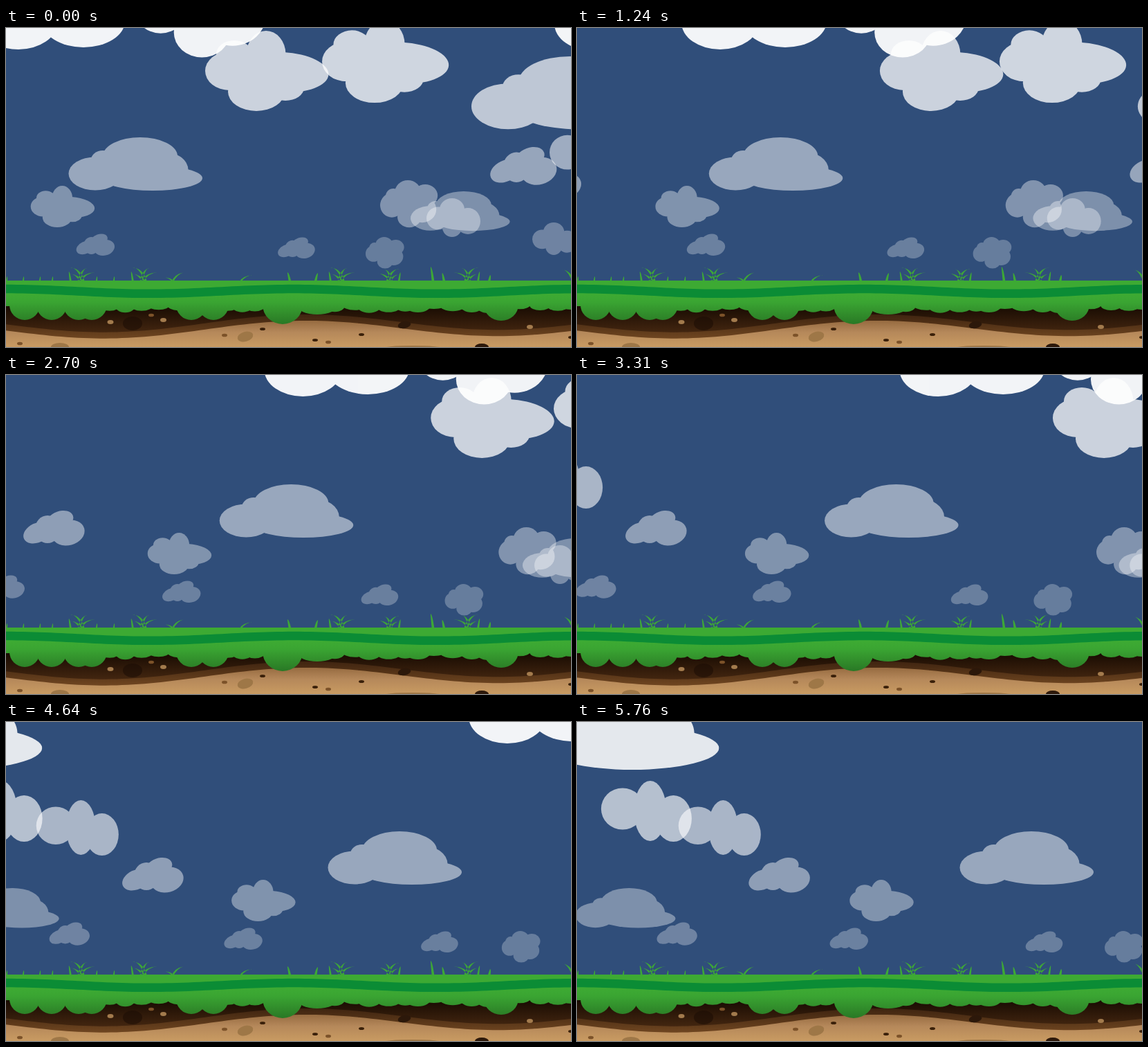
An HTML page that plays this animation: 817 px wide and 461 px high, repeating every 5.86 s.

```html
<!DOCTYPE html>
<html lang="en">
<head>
<meta charset="utf-8">
<title>Drifting clouds</title>
<style>
  html, body { margin: 0; width: 100%; height: 100%; overflow: hidden; background: #304e7a; }
  svg { display: block; width: 100vw; height: 100vh; }
</style>
</head>
<body>
<svg viewBox="0 0 817 461" preserveAspectRatio="none">
  <defs>
    <linearGradient id="turf" gradientUnits="userSpaceOnUse" x1="0" y1="386" x2="0" y2="428">
      <stop offset="0" stop-color="#3daa33"/><stop offset=".25" stop-color="#3aa432"/><stop offset="1" stop-color="#297825"/>
    </linearGradient>
    <linearGradient id="soil" gradientUnits="userSpaceOnUse" x1="0" y1="402" x2="0" y2="440">
      <stop offset="0" stop-color="#180b02"/><stop offset="1" stop-color="#432610"/>
    </linearGradient>
    <linearGradient id="clay" gradientUnits="userSpaceOnUse" x1="0" y1="414" x2="0" y2="448">
      <stop offset="0" stop-color="#3f2410"/><stop offset="1" stop-color="#6e4520"/>
    </linearGradient>
    <linearGradient id="sand" gradientUnits="userSpaceOnUse" x1="0" y1="422" x2="0" y2="461">
      <stop offset="0" stop-color="#94693f"/><stop offset=".45" stop-color="#b5885a"/><stop offset="1" stop-color="#c99b62"/>
    </linearGradient>
  </defs>
  <rect width="817" height="461" fill="#304e7a"/>
  <g id="sky" fill="#fff"></g>
  <g id="ground"></g>
</svg>
<script>
const WIDTH = 817, LOOP = 5860;
const SPEED = 0.0808, FARTHEST = 463, STEP = 50.75;

// Each kind: depth it is drawn at, then ellipses as cx, cy, rx, ry, rotation.
const KINDS = {
  flat: [1, [38.5, 52.5, 38.5, 24], [49.5, 33, 17, 14], [103.5, 27, 54, 27], [134.5, 47, 38.5, 27], [121.5, 59, 72, 18]],
  trio: [1.287, [31, 40.5, 31, 30], [71, 43.5, 23.5, 43.5], [104.5, 54.5, 26.5, 33.5]],
  tailed: [1.495, [35, 58, 35, 28], [42, 34, 26, 20], [88, 34, 28.5, 34], [112, 60, 66.5, 29, 3], [74, 88, 41, 28], [116, 82, 27, 19]],
  slanted: [0.912, [21, 32, 21, 14, -25], [36, 27, 18, 20], [54, 14, 20, 13, -20], [66, 32, 24, 18, -15]],
  blob: [0.783, [17, 36, 17, 17.5], [19, 23, 11, 11], [40, 18, 19, 18], [65, 22, 18, 16], [60.5, 42, 20.5, 19], [42, 53, 17, 15], [40, 37, 20, 14]],
  clover: [0.715, [17, 29, 17, 16.5], [37, 16, 18, 16], [60, 33, 18, 19], [37, 42, 14, 14], [40, 30, 20, 15]],
  twin: [1.885, [56, 39, 56, 39], [150, 37, 60, 38]]
};

// kind, start x, top y, depth; depth sets size, speed and opacity alike.
const CLOUDS = [
  ['blob', 520, 302, 0.525],
  ['slanted', 392.5, 302.5, 0.552],
  ['slanted', 101, 297.5, 0.57],
  ['slanted', -163, 289.5, 0.6],
  ['clover', 761, 281, 0.6],
  ['clover', 608, 246, 0.715],
  ['flat', 585, 236, 0.742],
  ['flat', -348, 240, 0.747],
  ['tailed', 35.7, 228, 0.7745],
  ['blob', 541, 220, 0.785],
  ['slanted', -175, 196, 0.912],
  ['slanted', 699, 172, 0.99],
  ['flat', 90.5, 158, 1],
  ['trio', 786, 146, 1.07],
  ['trio', -395, 113, 1.17],
  ['trio', -561, 85, 1.287],
  ['flat', 673, 41, 1.375],
  ['tailed', 288, 4, 1.495],
  ['tailed', 457, -11, 1.535],
  ['flat', -937, -65, 1.74],
  ['blob', 183, -120, 1.87],
  ['twin', -38, -47, 1.885],
  ['twin', 793, -45, 1.885]
];

const ellipse = (cx, cy, rx, ry, turn = 0) =>
  `<ellipse cx="${cx}" cy="${cy}" rx="${rx}" ry="${ry}" transform="rotate(${turn} ${cx} ${cy})"/>`;
const path = (d, fill) => `<path d="${d}" fill="${fill}"/>`;
const group = (fill, shapes) => `<g fill="${fill}">${shapes.join('')}</g>`;

// Band between a wavy top edge and the same edge shifted down.
function band(edge, height, fill) {
  const upper = [], lower = [];
  for (let x = 0; x <= WIDTH + 8; x += 8) {
    upper.push([x, edge(x)]);
    lower.unshift([x, edge(x) + height]);
  }
  return path('M' + [...upper, ...lower].join('L') + 'Z', fill);
}
const wave = (x, peak, period) => Math.cos((x - peak) / period * 2 * Math.PI);
const sandTop = x => 437.5 - 12 * wave(x, 430, 570) - 0.006 * x;
const stripeTop = x => 374.2 - 3.4 * wave(x, 0, 415);

function seeded(seed) {
  return () => (seed = (seed * 16807) % 2147483647) / 2147483647;
}

// An arching blade that droops towards its tip.
function blade(base, lean, height, width) {
  const tipX = base + lean, tipY = 365 - height, side = Math.sign(lean) * width / 2;
  return `M${base - side} 367Q${base + lean * 0.1} ${tipY + height * 0.1} ${tipX} ${tipY}` +
    `Q${base + lean * 0.3 + side} ${tipY - height * 0.02} ${base + side * 0.6 - lean * 0.1} 367Z`;
}
const tuft = (x, size) =>
  [[3, -18, 19, 6], [-15, -2, 13, 4], [-1, -15, 10, 5], [0, 22, 12, 6], [-2, 11, 18, 5]]
    .map(([dx, lean, height, width]) =>
      blade(x + dx * size, lean * size, height * Math.abs(size), width)).join('');

function grass() {
  const sprouts = [[242, 18, 12], [241, -14, 5], [340, 17, 8], [410, -3, 12], [448, 3, 11],
    [617, -3, 20], [633, -2, 11], [699, 1, 8], [819, -15, 16]];
  const tips = [1, 25, 49, 67, 131, 156];
  return [[108, 1], [198, 1], [484, 1], [555, -0.9], [668, -1]].map(t => tuft(...t)).join('') +
    sprouts.map(([x, lean, height]) => blade(x, lean, height, 5)).join('') +
    tips.map(x => blade(x, 0.5, 6, 3)).join('');
}

// A row of small random lobes with a few deep ones hanging below it.
function turf() {
  const random = seeded(11), lobes = [];
  const hang = (x, half, low) => lobes.push(ellipse(x, 400, half, low - 400));
  for (let x = 150; x < WIDTH + 10; x += 18 + 14 * random()) hang(x, 15 + 4 * random(), 406 + 6 * random());
  for (const x of [27, 66, 105, 124, 268, 300]) hang(x, 22, 422);
  hang(400, 29, 428);
  hang(450, 30, 414);
  hang(716, 25, 423);
  return group('url(#turf)', ['<rect y="365" width="817" height="37"/>', ...lobes]);
}

function stones() {
  const pebbles = (fill, rx, ry, spots) => group(fill, spots.map(([x, y]) => ellipse(x, y, rx, ry)));
  return pebbles('#3a200a', 4, 2, [[371, 435], [447, 451], [514, 443], [817, 447]]) +
    pebbles('#7c5229', 4, 2.3, [[20, 456], [210, 415], [316, 444], [466, 454]]) +
    pebbles('#a37b4d', 4.5, 3, [[151, 425], [227.5, 422], [757.5, 432]]) +
    group('#2c180a', [ellipse(576, 429, 9.5, 5, -12), ellipse(688, 461, 10, 5)]) +
    group('#9e7747', [ellipse(346, 446, 11.5, 7, -15), ellipse(78, 461, 13, 6), ellipse(588, 463, 45, 4)]) +
    group('#1c0e0599', [ellipse(183, 427, 14, 10)]);
}

document.getElementById('ground').innerHTML =
  path('M0 398H817V461H0Z', 'url(#soil)') +
  band(x => sandTop(x) - 9, 50, 'url(#clay)') +
  band(sandTop, 50, 'url(#sand)') +
  stones() + turf() +
  band(stripeTop, 12.5, '#0b8c35') +
  path(grass(), '#3da836');

const sky = document.getElementById('sky');
const clouds = CLOUDS.map(([kind, x, y, depth]) => {
  const [drawnAt, ...lobes] = KINDS[kind];
  const node = document.createElementNS('http://www.w3.org/2000/svg', 'g');
  node.setAttribute('opacity', depth / 2);
  node.innerHTML = lobes.map(lobe => ellipse(...lobe)).join('');
  sky.append(node);
  return { node, x, y, depth, scale: depth / drawnAt };
});

// The clouds move in small even steps rather than continuously.
function heldTime(t) {
  const step = Math.floor((t - 10) / STEP);
  return Math.max(0, Math.min(t, 30 + step * STEP));
}

function render(t) {
  const drift = Math.min(SPEED * heldTime(t), FARTHEST);
  for (const { node, x, y, depth, scale } of clouds) {
    node.setAttribute('transform', `translate(${x + drift * depth} ${y}) scale(${scale})`);
  }
}

render(0);
const start = performance.now();
requestAnimationFrame(function tick() {
  render((performance.now() - start) % LOOP);
  requestAnimationFrame(tick);
});
</script>
</body>
</html>
```
